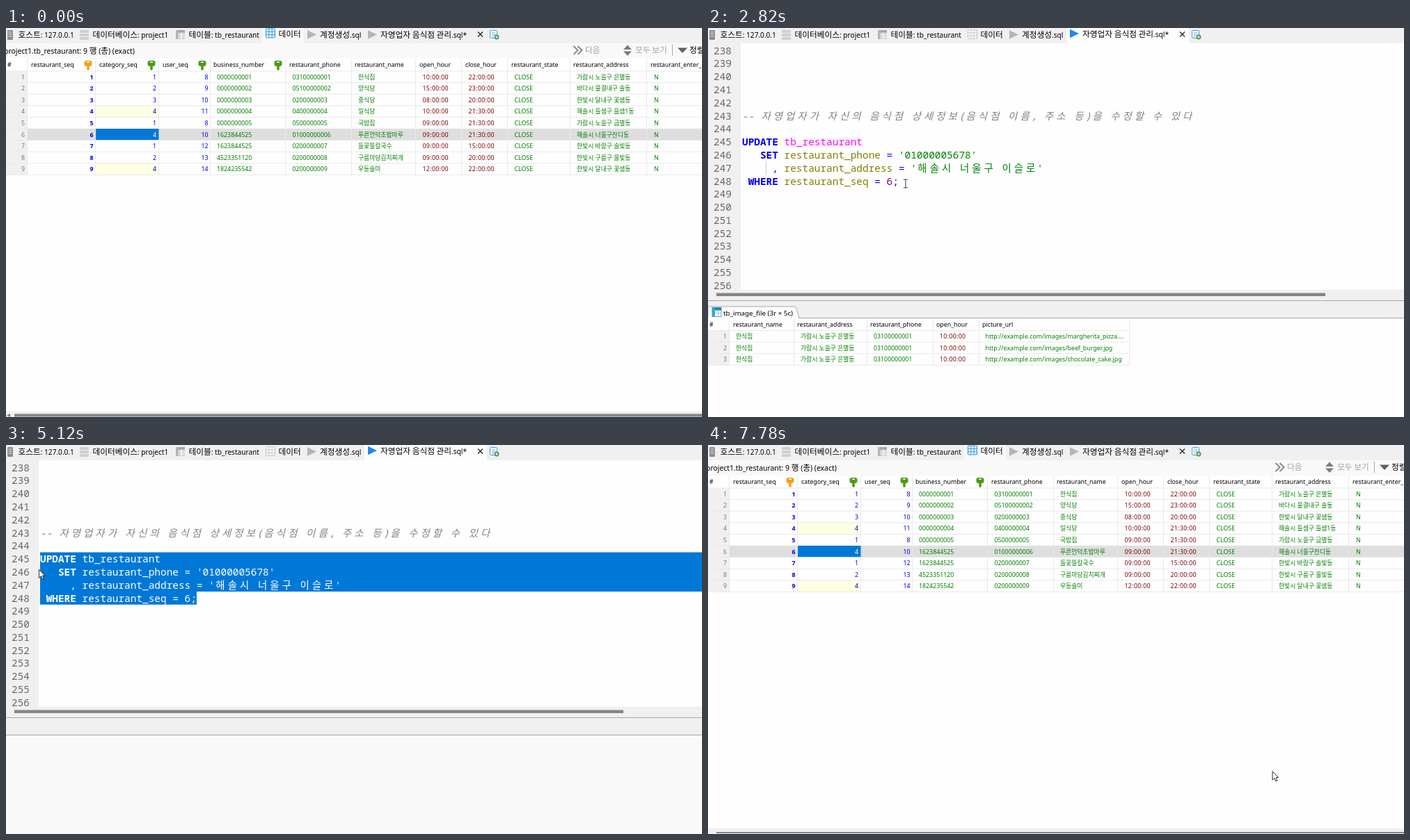
Recreate the animation shown at these times as an HTML page. Size 1000x560 px, loop 8000 ms.

```html
<!DOCTYPE html>
<html lang="ko">
<head>
<meta charset="utf-8">
<title>SQL client</title>
<style>
html, body { margin: 0; width: 100%; height: 100%; overflow: hidden; background: #fff; }
svg { display: block; width: 1000px; height: 560px; }
text { white-space: pre; }
.ui { font: 10.1px "Noto Sans", "Noto Sans CJK KR", sans-serif; fill: #000; }
.ui .ko { font-size: 11.7px; }
.cell { font: 8.8px "Noto Sans", "Noto Sans CJK KR", sans-serif; }
.time { letter-spacing: .32px; }
.code { font: 14.4px "Noto Sans Mono", "Noto Sans CJK KR", monospace; }
.b { font-weight: 700; }
.i { font-style: italic; }
.white text { fill: #fff; }
</style>
</head>
<body>
<svg id="stage" viewBox="0 0 1000 560" width="1000" height="560"></svg>
<script>
const LOOP = 8000;
const COL = 8.65, LEFT = 49, LINE = 18.78, FIRST = 238, TOP = 23;
const ROW = 16.6;
const GREEN = '#008000', BLUE = '#0000e8', MAROON = '#800000', BLACK = '#000';

const rect = (x, y, w, h, fill, more = '') =>
  `<rect x="${x}" y="${y}" width="${w}" height="${h}" fill="${fill}" ${more}/>`;
const path = (d, fill, more = '') => `<path d="${d}" fill="${fill}" ${more}/>`;
const stroke = (d, color, w = 1) => path(d, 'none', `stroke="${color}" stroke-width="${w}"`);
const group = (id, body, more = '') => `<g id="${id}" ${more}>${body}</g>`;
const cell = (x, y, s, fill, more = '', cls = '') =>
  `<text class="cell ${cls}" x="${x}" y="${y}" fill="${fill}" ${more}>${s}</text>`;
const END = 'text-anchor="end"';

// Hangul is set a little larger than Latin in the interface text
const ui = (x, y, s, fill = BLACK, size = '') =>
  `<text class="ui" x="${x}" y="${y}" style="fill:${fill};${size}">` +
  s.replace(/[가-힣]+/g, k => `<tspan class="ko">${k}</tspan>`) + '</text>';

// ---- tab strip ----
const gridIcon = (color, fill) =>
  rect(373.5, 2.5, 13, 13, fill, `rx="1.5" stroke="${color}" stroke-width="1.2"`) +
  stroke('M377.8 2.5v13M382.2 2.5v13M373.5 6.8h13M373.5 11.2h13', color);
const playIcon = (x, color) => path(`M${x} 3.2l13 6.3l-13 6.3z`, color);

function tabStrip() {
  const server = rect(2, 3, 8, 14, '#8c8c8c', 'rx="1"') +
    stroke('M3.5 6h5M3.5 9h5M3.5 12h5', '#e8e8e8');
  const stack = [3, 8, 13].map(y => rect(106, y, 13, 4, '#cfcfcf', 'rx="1"')).join('');
  const table = rect(244, 3, 13, 13, '#d0d0d0') + rect(244, 3, 13, 3.5, '#a6a6a6') +
    rect(244, 3, 3.5, 13, '#b4b4b4') + stroke('M247.5 9.7h9.5M247.5 13h9.5M252 6.5v9.5', '#fff');
  const add = rect(695.5, 3.5, 10, 11, '#f4faff', 'rx="1" stroke="#4d9bd8"') +
    stroke('M698 7h5M698 9.5h5M698 12h3', '#7bb6e4') +
    '<circle cx="705" cy="13" r="3.4" fill="#3f9a4d"/>' + stroke('M703 13h4M705 11v4', '#fff');
  return rect(0, 0, 1000, 22, '#f0f0f0') +
    rect(368, 0, 60, 22, '#f9f9f9', 'id="dataBg"') + rect(515, 0, 176, 22, '#fdfdfd', 'id="sqlBg"') +
    server + ui(17.5, 14, '호스트: 127.0.0.1') +
    stack + ui(124.5, 14, '데이터베이스: project1') +
    table + ui(262.5, 14, '테이블: tb_restaurant') +
    group('dataTab', group('gridOn', gridIcon('#3d9be0', '#e3f1fc')) +
      group('gridOff', gridIcon('#cbcbcb', '#f8f8f8')) + ui(391.5, 14, '데이터')) +
    playIcon(433, '#b5b5b5') + ui(451, 14, '계정생성.sql') +
    group('sqlTab', group('playOff', playIcon(520, '#b5b5b5')) + group('playOn', playIcon(520, '#1e88ee')) +
      ui(538, 14, '자영업자 음식점 관리.sql*')) +
    stroke('M678 5.5l7 7M685 5.5l-7 7', '#222', 1.3) + add;
}

// ---- tables ----
function lines(xs, y0, y1, right, count, head) {
  let d = xs.map(x => `M${x + .5} ${y0}V${y1}`).join('');
  for (let i = 0; i <= count; i++) d += `M0 ${head + i * ROW}H${right}`;
  return stroke(d, '#e9e9e9');
}

const key = (x, color) =>
  rect(x - 5.5, 47, 11, 8, color, 'rx="3"') +
  path(`M${x - 1.8} 54h3.6v5.5l-1.8 1.8l-1.8-1.8z`, color) +
  rect(x - 2, 48.6, 4, 1.5, '#fff', 'rx=".6"');

const HEADS = [[36, 'restaurant_seq'], [134, 'category_seq'], [225, 'user_seq'], [298, 'business_number'],
  [407, 'restaurant_phone'], [501, 'restaurant_name'], [594, 'open_hour'], [660, 'close_hour'],
  [726, 'restaurant_state'], [815, 'restaurant_address'], [926, 'restaurant_enter_']];
const SHOPS = `1|8|0000000001|03100000001|한식집|10:00|22:00|가람시 노을구 은별동
2|9|0000000002|05100000002|양식당|15:00|23:00|바다시 물결내구 솔동
3|10|0000000003|0200000003|중식당|08:00|20:00|한빛시 달내구 꽃샘동
4|11|0000000004|0400000004|일식당|10:00|21:30|해솔시 들샘구 들샘1동
1|8|0000000005|0500000005|국밥집|09:00|21:30|가람시 노을구 금별동
4|10|1623844525|01000000006|푸른언덕초밥마루|09:00|21:30|해솔시 너울구잔디동
1|12|1623844525|0200000007|들꽃뜰칼국수|09:00|15:00|한빛시 바람구 솔빛동
2|13|4523351120|0200000008|구름마당김치찌개|09:00|20:00|한빛시 구름구 물빛동
4|14|1824235542|0200000009|우동솔미|12:00|22:00|한빛시 달내구 꽃샘동`.split('\n').map(r => r.split('|'));

function dataView() {
  let s = rect(0, 22, 1000, 538, '#fefefe') + rect(0, 22, 1000, 22, '#f9f9f9') +
    ui(-3, 36.5, 'project1.tb_restaurant: 9 행 (총) (exact)', BLACK, 'font-size:10.4px') +
    stroke('M815.5 26l6 6l-6 6M821.5 26l6 6l-6 6', '#8a8a8a', 2) + ui(832, 36, '다음', '#a0a0a0') +
    path('M887 31l6-6.5l6 6.5zM887 33.5l6 6.5l6-6.5z', '#7c7c7c') + ui(904, 36, '모두 보기', '#a0a0a0') +
    stroke('M957.5 24v16', '#a8a8a8') + path('M965 28.5h14l-7 7.5z', '#606060') + ui(982, 36, '정렬') +
    rect(0, 44, 1000, 18, '#fff') + rect(0, 62, 30, 9 * ROW, '#f0f0f0') +
    rect(30, 62 + 5 * ROW, 970, ROW, '#dedede');
  for (const i of [3, 8]) s += rect(129, 62 + i * ROW, 90, ROW, '#ffffe1');
  s += lines([30, 128, 219, 293, 401, 496, 588, 654, 720, 810, 920], 44, 62 + 9 * ROW, 1000, 9, 62);
  s += rect(129, 62 + 5 * ROW, 90.5, ROW - .5, '#0078d7');
  s += cell(2, 56.2, '#', BLACK) + HEADS.map(([x, t]) => cell(x, 56.2, t, BLACK)).join('');
  s += key(118, '#f2a01e') + [209, 282, 391].map(x => key(x, '#4f9a14')).join('');
  SHOPS.forEach(([cat, user, biz, tel, name, open, close, addr], i) => {
    const y = 73.6 + i * ROW;
    s += cell(27, y, i + 1, '#777', END) + cell(125.5, y, i + 1, BLUE, END, 'b') +
      cell(216, y, cat, i === 5 ? '#fff' : BLUE, END) + cell(290.5, y, user, BLUE, END) +
      cell(303, y, biz, GREEN) + cell(411.5, y, tel, GREEN) + cell(506, y, name, GREEN) +
      cell(598.5, y, open + ':00', MAROON, '', 'time') + cell(664.5, y, close + ':00', MAROON, '', 'time') +
      cell(730.5, y, 'CLOSE', GREEN) + cell(820, y, addr, GREEN) + cell(931, y, 'N', GREEN);
  });
  return s + group('ghost', stroke('M0 394.5H1000M0 418.5H1000', '#f3f3f3')) +
    rect(0, 552, 1000, 8, '#f0f0f0') + rect(12, 557, 988, 2, '#858585', 'id="bar"') +
    group('barArrow', path('M1 558l5-3v5z', '#777'));
}

// ---- SQL editor ----
const lineTop = n => TOP + (n - FIRST) * LINE;
const colX = c => LEFT + c * COL;

// Monospaced grid: Hangul takes two columns
function token(line, col, s, fill, cls = '') {
  let c = col;
  const xs = [...s].map(ch => {
    const wide = /[가-힣]/.test(ch);
    const x = colX(c) + (wide ? 1.5 : 0);
    c += wide ? 2 : 1;
    return x.toFixed(2);
  });
  return `<text class="code ${cls}" x="${xs.join(' ')}" y="${(lineTop(line) + 14.7).toFixed(2)}" fill="${fill}">${s}</text>`;
}

const KEYWORD = '#0000ee', FIELD = '#808000', OP = '#0000ff';
const query = () => [
  [245, 0, 'UPDATE', KEYWORD, 'b'], [245, 7, 'tb_restaurant', '#ff00ff'],
  [246, 3, 'SET', KEYWORD, 'b'], [246, 7, 'restaurant_phone', FIELD], [246, 24, '=', OP],
  [246, 26, "'01000005678'", GREEN],
  [247, 5, ',', OP], [247, 7, 'restaurant_address', FIELD], [247, 26, '=', OP],
  [247, 28, "'해솔시 너울구 이슬로'", GREEN],
  [248, 1, 'WHERE', KEYWORD, 'b'], [248, 7, 'restaurant_seq', FIELD], [248, 22, '=', OP],
  [248, 24, '6', '#800080'], [248, 25, ';', OP]
].map(a => token(...a)).join('');

function resultTable() {
  let s = rect(0, 418, 1000, 142, '#fefefe') + rect(0, 435.5, 30, 3 * ROW, '#f0f0f0') +
    path('M0 417.5V403q0-2 2-2H124q2 0 3 3l4 13.5z', '#fdfdfd', 'stroke="#a8a8a8"') +
    rect(0, 417, 130, 2, '#fdfdfd') +
    rect(6, 402.5, 13, 13, '#fff', 'stroke="#2d8fb5" stroke-width=".8"') + rect(6, 402.5, 13, 4, '#1687b0') +
    rect(6, 402.5, 4, 13, '#36a6cc') + stroke('M10 410.5h9M14.5 406.5v9', '#9ccfe2') +
    cell(22, 413.8, 'tb_image_file (3r × 5c)', BLACK, 'style="font-size:9.8px"') +
    lines([30, 123, 228, 323, 389, 605], 419, 435.5 + 3 * ROW, 606, 3, 435.5);
  s += [[2, '#'], [36, 'restaurant_name'], [128, 'restaurant_address'], [233, 'restaurant_phone'],
    [328, 'open_hour'], [394, 'picture_url']].map(([x, t]) => cell(x, 430, t, BLACK)).join('');
  ['margherita_pizza....', 'beef_burger.jpg', 'chocolate_cake.jpg'].forEach((file, i) => {
    const y = 447.2 + i * ROW;
    s += cell(27, y, i + 1, '#777', END) + cell(40, y, '한식집', GREEN) +
      cell(133, y, '가람시 노을구 은별동', GREEN) + cell(238, y, '03100000001', GREEN) +
      cell(333, y, '10:00:00', MAROON, '', 'time') + cell(398.5, y, 'http://example.com/images/' + file, GREEN);
  });
  return s;
}

function editorView() {
  let nums = '';
  for (let n = FIRST; n <= 256; n++)
    nums += `<text class="code" x="8" y="${(lineTop(n) + 14.7).toFixed(2)}" fill="#686868">${n}</text>`;
  return rect(0, 22, 1000, 355, '#fefefe') + rect(0, 22, 47, 355, '#f0f0f0') + nums +
    token(243, 0, '-- 자영업자가 자신의 음식점 상세정보(음식점 이름, 주소 등)을 수정할 수 있다', '#808080', 'i') +
    stroke(`M83.5 ${lineTop(247)}v${LINE}`, '#cfcfcf') + query() +
    `<clipPath id="selClip"><path id="selShape" d=""/></clipPath>` +
    group('selection', rect(0, 0, 1000, 560, '#0078d7') + query(), 'class="white" clip-path="url(#selClip)"') +
    rect(0, 376.5, 1000, 41, '#f0f0f0') + rect(12, 381.5, 875, 4.5, '#858585') +
    stroke('M0 392.5H1000M0 417.5H1000', '#a6a6a6') + rect(0, 418, 1000, 142, '#f9f9f9') +
    group('result', resultTable());
}

const pointer =
  '<circle id="halo" r="10.5" fill="#f3e52c" fill-opacity=".75"/>' +
  group('arrow', path('M0 0V12.2L2.9 9.5L4.9 14L6.9 13.1L5 8.8H8.8Z', '#fff',
    'stroke="#111" stroke-width=".9" stroke-linejoin="round"')) +
  group('beam', stroke('M-3-6h2.2l.8 .8l.8-.8h2.2M0-5.2V5.2M-3 6h2.2l.8-.8l.8 .8h2.2', '#444', 1.1));

const stage = document.getElementById('stage');
stage.innerHTML = group('data', dataView()) + group('editor', editorView()) + tabStrip() + pointer;
const el = id => document.getElementById(id);
const show = (id, on) => { el(id).style.display = on ? '' : 'none'; };

// ---- motion: time, x, y ----
const PATH = [
  [0, 1006, 546], [460, 1003, 540], [650, 930, 380], [850, 770, 160], [1050, 630, 34], [1200, 594, 6],
  [1280, 594, 8], [2090, 594, 8], [2250, 470, 60], [2400, 270, 150], [2540, 112, 205], [2680, 210, 229],
  [2820, 284, 224], [2890, 277, 224], [2960, 275, 224], [3040, 120, 200], [3120, 22, 183], [3190, 15, 178],
  [3400, 18, 168], [3720, 25, 164], [4060, 47, 179], [5120, 47, 179], [5280, 110, 219], [5450, 200, 200],
  [5700, 330, 95], [5920, 393, 38], [5990, 399, 27], [6200, 404, 9], [6790, 404, 9], [6950, 470, 75],
  [7200, 680, 290], [7400, 820, 455], [7580, 865, 513], [7780, 811, 470], [LOOP, 811, 470]
];
function at(t) {
  let i = 1;
  while (i < PATH.length - 1 && PATH[i][0] < t) i++;
  const [t0, x0, y0] = PATH[i - 1], [t1, x1, y1] = PATH[i];
  const k = (t - t0) / (t1 - t0);
  return [x0 + (x1 - x0) * k, y0 + (y1 - y0) * k];
}

// The selection follows the pointer with a short lag
function selShape(t) {
  if (t < 2960) return '';
  const [x, y] = at(Math.min(Math.max(t - 30, 2960), 3720));
  const line = Math.max(245, Math.min(248, FIRST + Math.floor((y - TOP) / LINE)));
  const col = Math.max(0, Math.min(26, Math.round((x - LEFT) / COL)));
  let d = '';
  for (let n = line; n <= 248; n++) {
    const a = n === line ? colX(col) : LEFT, b = n === 248 ? colX(26) : 1000;
    d += `M${a} ${lineTop(n)}H${b}v${LINE + .1}H${a}z`;
  }
  return d;
}

function draw(t) {
  const sqlTab = t >= 1740 && t < 6320;
  const editing = t >= 1820 && t < 6390;
  const drag = t >= 2960 && t < 3790;
  const click = (t >= 1740 && t < 1890) || (t >= 6320 && t < 6460);
  show('editor', editing);
  show('data', !editing);
  show('ghost', sqlTab);
  show('dataBg', !sqlTab);
  show('sqlBg', sqlTab);
  el('dataTab').setAttribute('transform', `translate(0 ${sqlTab ? 0 : -1.5})`);
  el('sqlTab').setAttribute('transform', `translate(0 ${sqlTab ? -1.5 : 0})`);
  show('gridOn', !editing);
  show('gridOff', editing);
  show('playOn', editing);
  show('playOff', !editing);
  show('result', t < 4590);
  el('selShape').setAttribute('d', selShape(t));

  const wide = t < 900;
  show('barArrow', wide);
  el('bar').setAttribute('y', wide ? 555.5 : 557);
  el('bar').setAttribute('height', wide ? 4 : 2);

  const [x, y] = at(t);
  const beam = editing && y > 22 && y < 376 && (x > LEFT || drag);
  show('beam', beam);
  show('arrow', !beam);
  show('halo', drag || click);
  for (const id of ['beam', 'arrow']) el(id).setAttribute('transform', `translate(${x} ${y})`);
  el('halo').setAttribute('cx', x + (drag ? 0 : 1));
  el('halo').setAttribute('cy', y + (drag ? 0 : 1));
}

const start = performance.now();
function tick() {
  draw((performance.now() - start) % LOOP);
  requestAnimationFrame(tick);
}
draw(0);
requestAnimationFrame(tick);
</script>
</body>
</html>
```
